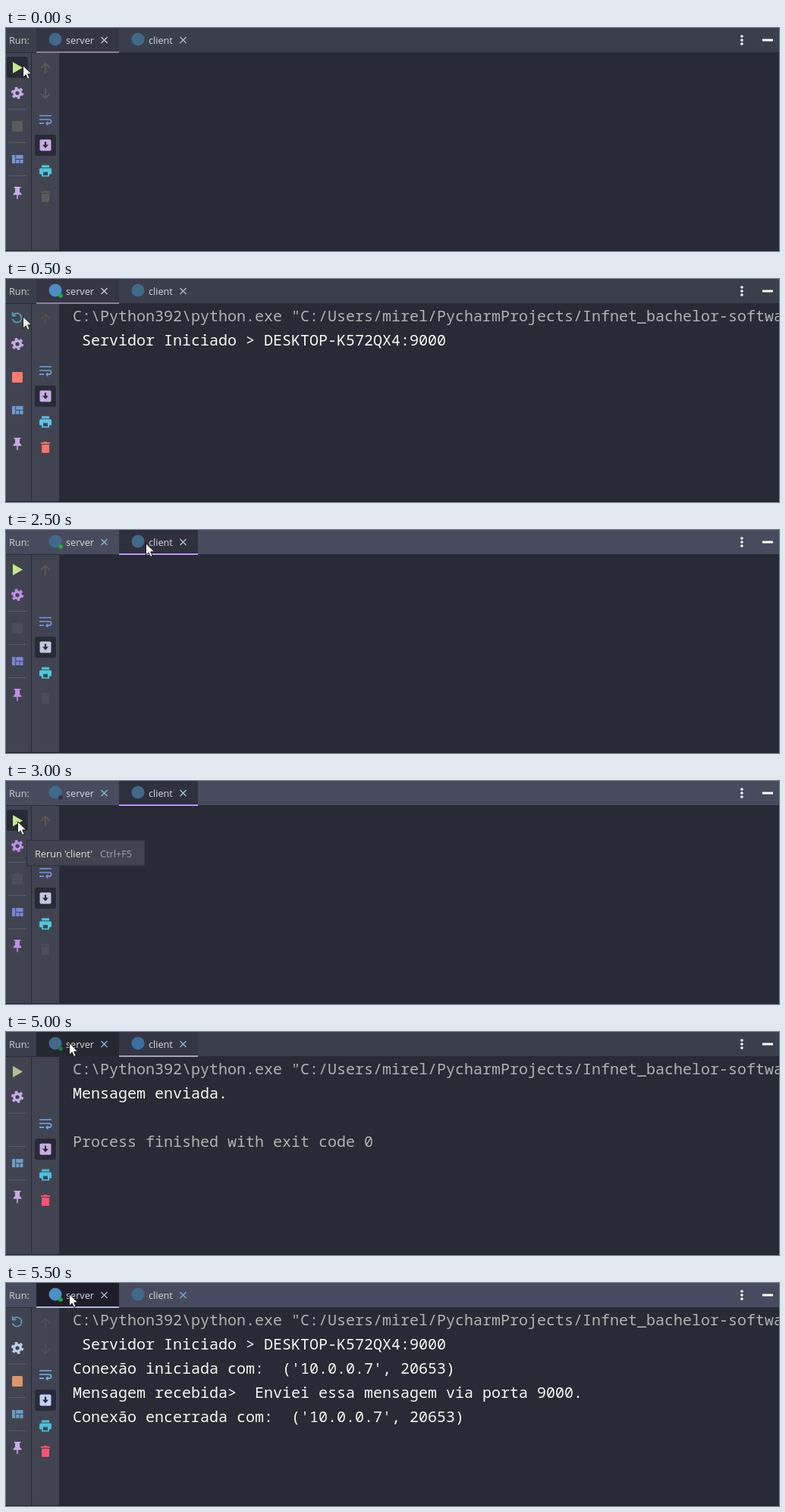
An HTML page that plays this animation: 1019x295 px, repeating every 7500 ms.

```html
<!DOCTYPE html>
<html lang="pt">
<head>
<meta charset="utf-8">
<title>Run panel</title>
<style>
  html, body { margin: 0; width: 100%; height: 100%; overflow: hidden; background: #282a36; }
  svg { display: block; width: 100%; height: 100%; }
  text { white-space: pre; }
  .ui { font: 12.7px "Open Sans", "Noto Sans", sans-serif; }
  .mono { font: 20px "Noto Sans Mono", "DejaVu Sans Mono", monospace; }
</style>
</head>
<body>
<svg id="stage" viewBox="0 0 1019 295"></svg>
<script>
const LOOP = 7500;
const BG = '#282a36', BAR = '#414450', GREY = '#b2b2b2', WHITE = '#f8f8f2';

const command = ['C:\\Python392\\python.exe "C:/Users/mirel/PycharmProjects/Infnet_bachelor-software', GREY];
const started = [' Servidor Iniciado > DESKTOP-K572QX4:9000', WHITE];
const clientLog = [command, ['Mensagem enviada.', WHITE], ['', GREY], ['Process finished with exit code 0', GREY]];
const serverLog = [
  command, started,
  ["Conexão iniciada com:  ('10.0.0.7', 20653)", WHITE],
  ['Mensagem recebida>  Enviei essa mensagem via porta 9000.', WHITE],
  ["Conexão encerrada com:  ('10.0.0.7', 20653)", WHITE]
];

// Each step overrides the values of the step before it.
const steps = [
  { at: 0, head: '#3b3e4b', cursor: [22, 49], log: [], hover: true, run: 'play', runColor: '#c3e88d',
    server: '#353546', client: '', line: [40, '#8c809c'], dot: '', logo: ['#41698a', '#41698a'],
    close: ['#c9cacc', '#b4b8bd'], gear: '#c9abe6', rule: '#5b5d68', stop: '#5b5d5c', grid: '#7595d8',
    pin: '#c9abe6', up: '#5c5f5d', down: '#5c5f5d', wrap: '#7595d8', end: '#c9abe6',
    print: '#4cc9dc', trash: '#5b5d5c', tip: false, mini: '#ffffff' },
  { at: 500, hover: false, log: [command, started], run: 'rerun', runColor: '#5aa2c2', dot: '#18b52c',
    logo: ['#4b8fc4', '#41698a'], stop: '#fa7a70', rule: '', up: '#5e4a50', down: '', grid: '#6c9bd2',
    wrap: '#6c9bd2', print: '#5cc4e8', trash: '#f8766c', mini: '#fbfbdc' },
  { at: 2000, cursor: [184, 17], server: '#393d49', client: BG, line: [40, '#7b8793'],
    logo: ['#4b8fc4', '#53636f'], close: ['#a9c0c8', '#a9b4ba'] },
  { at: 2500, head: '#484b5e', log: [], run: 'play', runColor: '#c3e88d', server: '', client: '#2f303d',
    line: [149, '#bd93f9'], dot: '#18b52c', logo: ['#41698a', '#41698a'], close: ['#85bcc8', '#a8c4cc'],
    gear: '#c08fe8', rule: '#595c6b', stop: '#4b4d5c', grid: '#7a86dc', pin: '#c08fe8', up: '#6a565c',
    down: '', wrap: '#7a90e8', end: '#c3c6e0', print: '#4cc9dc', trash: '#4b4d5c', mini: '#ffffff' },
  { at: 3000, cursor: [15, 53], hover: true, tip: true, dot: '#2e303a' },
  { at: 3500, head: '#3b3f4c', cursor: [30.5, 54], log: clientLog, hover: false, tip: false, runColor: '#b3bf8e',
    client: '#343644', line: [149, '#a7a5b4'], dot: '#1e9a32', logo: ['#41698a', '#3d6ea2'],
    close: ['#82b4e0', '#82b4e0'], gear: '#c9abe6', rule: '#555965', stop: '', grid: '#6a9bc6', pin: '#c9abe6',
    up: '', wrap: '#74a8ee', end: '#c9abe6', print: '#4cbfdc', trash: '#fa5570' },
  { at: 5000, cursor: [83, 14], server: '#252731', up: '#37465a', dot: '#1d7e2e' },
  { at: 5500, head: '#484b5f', log: serverLog, run: 'rerun', runColor: '#5aa2c2', server: '#1f1d29', client: '',
    line: [40, '#b0b9d8'], dot: '#18b52c', logo: ['#4b8fc4', '#41698a'], close: ['#a9b4bd', '#78a8d8'],
    gear: '#bfd0ee', stop: '#df956a', grid: '#6a9bc6', up: '#4d4f5d', down: '#4d4f5d', wrap: '#6cb2ee',
    end: '#bfd0f6' }
];
steps.forEach((s, i) => { steps[i] = { ...steps[i - 1], ...s }; });

const rect = (x, y, w, h, fill, r = 0) =>
  fill ? `<rect x="${x}" y="${y}" width="${w}" height="${h}" rx="${r}" fill="${fill}"/>` : '';
const fill = (d, color) => color ? `<path d="${d}" fill="${color}"/>` : '';
const line = (d, color, w = 1.5) =>
  color ? `<path d="${d}" fill="none" stroke="${color}" stroke-width="${w}"/>` : '';
const disc = (x, y, r, color) => color ? `<circle cx="${x}" cy="${y}" r="${r}" fill="${color}"/>` : '';
const escape = s => s.replace(/&/g, '&amp;').replace(/</g, '&lt;');
const text = (x, y, s, color, cls = 'ui') =>
  `<text x="${x}" y="${y}" class="${cls}" fill="${color}">${escape(s)}</text>`;

function tab(x, w, name, bg, logo, dot, close) {
  const cx = x + w - 19.5;
  return rect(x, 0, w, 32, bg) + disc(x + 25, 15, 8.5, logo) + disc(x + 32, 22, 2.8, dot) +
    text(x + 39, 20.5, name, '#d9dade') +
    line(`M${cx - 4} 12l8 8m0-8l-8 8`, close, 1.4);
}

function header(s) {
  const [x, color] = s.line;
  return rect(0, 0, 1019, 32, s.head) + text(4, 20.5, 'Run:', '#d3d2cf') +
    tab(40, 109, 'server', s.server, s.logo[0], s.dot, s.close[0]) +
    tab(149, 104, 'client', s.client, s.logo[1], '', s.close[1]) +
    rect(x, 31, x === 40 ? 109 : 104, 2, color) +
    [11, 16, 21].map(y => disc(970, y, 1.8, '#fff')).join('') + rect(997, 14.5, 14, 3, s.mini);
}

function gear(color) {
  const ring = (r, w, dash) =>
    `<circle cx="15" cy="86" r="${r}" fill="none" stroke="${color}" stroke-width="${w}" stroke-dasharray="${dash}"/>`;
  return ring(4.3, 3.4, 'none') + ring(6.8, 2.6, '3.6 3.52');
}

function leftBar(s) {
  const run = s.run === 'play'
    ? fill('M9 45V60L22 52.5Z', s.runColor)
    : line('M10 47.5A6 6 0 1 1 8.7 53M8.7 44v4.7h4.7', s.runColor, 1.7);
  return rect(0, 33, 33, 261, BAR) + rect(1, 38, 28, 28, s.hover && BG, 3) + run + gear(s.gear) +
    [107, 151, 195].map(y => rect(3, y, 23, 1, s.rule)).join('') +
    rect(8, 123, 14, 14, s.stop, 1.5) +
    fill('M8 168h4.2v11H8zM13.2 168h9.3v5h-9.3zM13.2 174h4.2v5h-4.2zM18.4 174h4.1v5h-4.1z', s.grid) +
    fill('M10.5 210h9v1.6H18v5.4l2.5 2.4v1.4h-4.7v5.4h-1.6v-5.4H9.5v-1.4l2.5-2.4v-5.4h-1.5z', s.pin);
}

function toolBar(s) {
  return rect(34, 33, 36, 261, BAR) +
    line('M52 60V47M46 53l6-6 6 6', s.up) + line('M52 80V93M46 87l6 6 6-6', s.down) +
    line('M44 116H60M44 121H57a2.6 2.6 0 0 1 0 5.2H54M44 126.2H50', s.wrap, 1.7) +
    fill('M55.5 123v6.4l-3.5-3.2z', s.wrap) +
    rect(38, 141, 28, 28, BG, 3) + rect(44.5, 147.5, 15, 15, s.end, 1.8) +
    fill('M50.9 150.5h2.2v4h2.9l-4 4.4-4-4.4h2.9z', BG) +
    rect(47, 181.5, 10, 3, s.print) + rect(44, 185.5, 16, 8, s.print, 1.5) +
    rect(47, 189.5, 10, 7, s.print) + rect(49, 190.5, 6, 4.5, BAR) +
    fill('M46 216.2h3.5l1-1h3l1 1H58v1.8H46zM47 219h10v9.5a1.5 1.5 0 0 1-1.5 1.5h-7a1.5 1.5 0 0 1-1.5-1.5z', s.trash);
}

function tooltip() {
  return `<rect x="27.5" y="78.5" width="155.500" height="33.5" fill="${BAR}" stroke="#2d2f3a"/>` +
    text(38, 101, "Rerun 'client'", '#e2e2d8') + text(124, 101, 'Ctrl+F5', '#a3a5ad');
}

function pointer([x, y]) {
  return `<path transform="translate(${x} ${y})" d="M.5 .8V16.2L4.1 12.8 6.6 18.4 9.1 17.3 6.7 11.8H11.600Z"
    fill="#fff" stroke="#111" stroke-width=".9"/>`;
}

const stage = document.getElementById('stage');
let shown;

function render(t) {
  const s = steps.filter(step => step.at <= t).pop();
  if (s === shown) return;
  shown = s;
  stage.innerHTML = rect(0, 0, 1019, 295, BG) + header(s) + leftBar(s) + toolBar(s) +
    s.log.map(([str, color], i) => text(88, 56 + 32 * i, str, color, 'mono')).join('') +
    rect(0, 294, 1019, 1, '#1f212b') + (s.tip ? tooltip() : '') + pointer(s.cursor);
}

const begin = performance.now();
function tick() {
  render((performance.now() - begin) % LOOP);
  requestAnimationFrame(tick);
}
tick();
</script>
</body>
</html>
```
